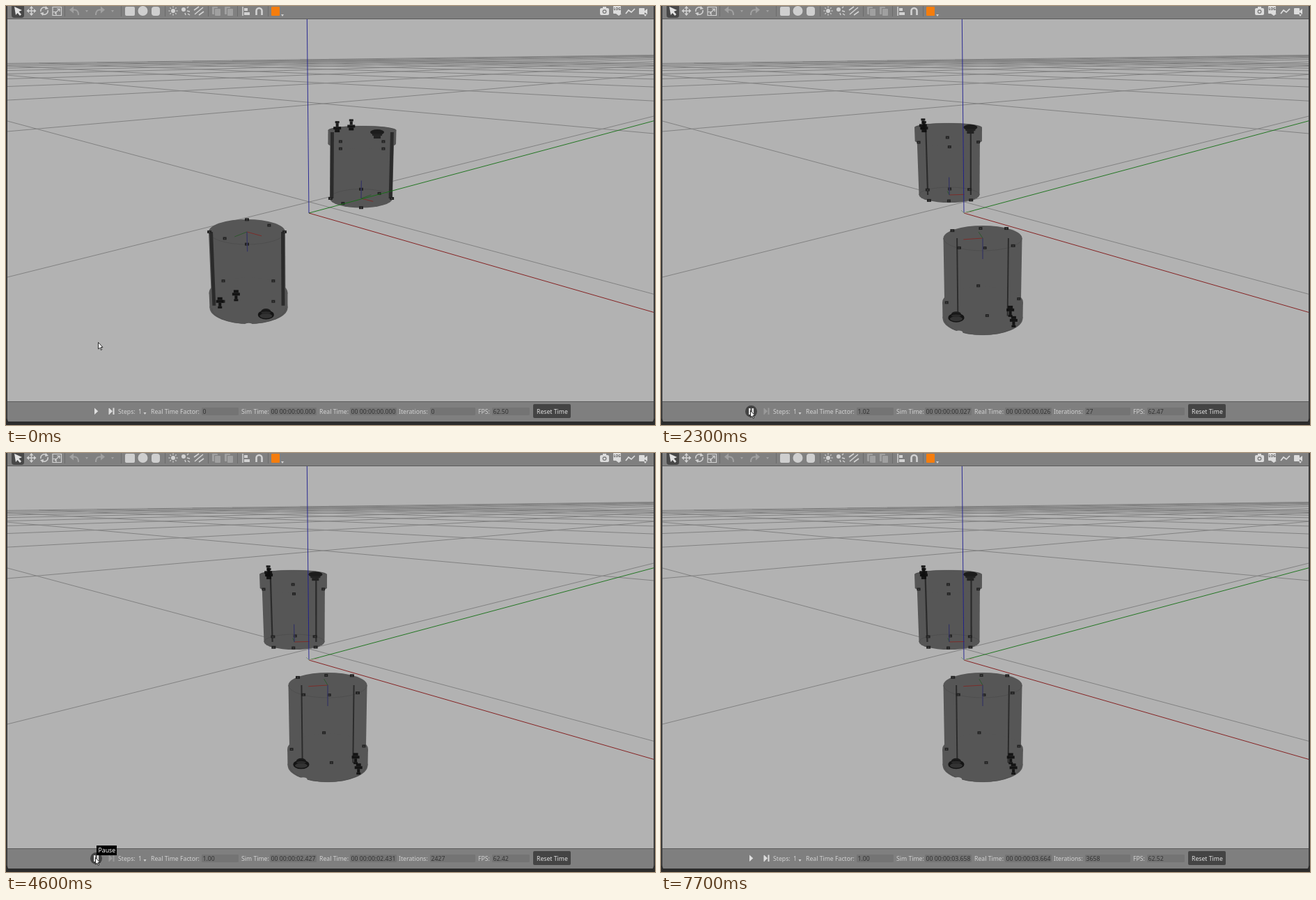
Animation of 932 by 601 pixels, one loop 8 s. Source, as an HTML page with a canvas:

```html
<!DOCTYPE html>
<html lang="en">
<head>
<meta charset="utf-8">
<title>Simulation view</title>
<style>
html, body { margin: 0; width: 100%; height: 100%; overflow: hidden; background: #2d2d2d; }
canvas { display: block; }
</style>
</head>
<body>
<canvas id="stage" width="932" height="601"></canvas>
<script>
const ctx = document.getElementById('stage').getContext('2d');
const LOOP = 8000;
const FONT = '8.7px "Noto Sans", "Open Sans", sans-serif';
const VIEW = '#b2b2b2', BAR = '#808080', RULE = '#5c5c5c';
const LIGHT = '#d2d2d2', DIM = '#a0a0a0', BODY = '#565656', DARK = '#222';

// Ground plane: horizon height and the vanishing points of both grid directions.
const HORIZON = 65.6, VX = -369.6, VY = 1301.6;
const ORIGIN = { x: 435, y: 297 };

// The same tank four times: end ellipses [x, y, rx, ry] and turn in degrees.
const BEFORE = [
  { lid: [511.5, 178, 46, 6], foot: [510, 276, 45, 13.5], turn: 0 },
  { lid: [348.5, 433, 53, 23], foot: [346, 324, 55, 18], turn: 0 }
];
const AFTER = [
  { lid: [412.5, 174, 45.5, 6], foot: [414, 271, 43.5, 11], turn: -47 },
  { lid: [462, 448, 54.5, 24], foot: [462, 333, 56.5, 18], turn: 128 }
];

const RUN = 2300, STOP = 6000, TIP = 4000;
// Last two digits of the frame rate, held until the next time.
const RATES = [[0, 50], [1300, 47], [2500, 37], [4000, 38], [4300, 42], [5500, 46], [6300, 48], [7700, 52]];

function line(x0, y0, x1, y1, color, width = 1) {
  ctx.strokeStyle = color;
  ctx.lineWidth = width;
  ctx.beginPath();
  ctx.moveTo(x0, y0);
  ctx.lineTo(x1, y1);
  ctx.stroke();
}
function rect(x, y, w, h, color) {
  ctx.fillStyle = color;
  ctx.fillRect(x, y, w, h);
}
function round(x, y, w, h, r, color) {
  ctx.fillStyle = color;
  ctx.beginPath();
  ctx.roundRect(x, y, w, h, r);
  ctx.fill();
}
function oval(x, y, rx, ry, color) {
  ctx.fillStyle = color;
  ctx.beginPath();
  ctx.ellipse(x, y, rx, ry, 0, 0, 2 * Math.PI);
  ctx.fill();
}
function shape(d, color) {
  ctx.fillStyle = color;
  ctx.fill(new Path2D(d));
}
function stroke(d, color, width = 1) {
  ctx.strokeStyle = color;
  ctx.lineWidth = width;
  ctx.stroke(new Path2D(d));
}
function text(s, x, y, color) {
  ctx.fillStyle = color;
  ctx.font = FONT;
  ctx.fillText(s, x, y);
}
function caret(x, y, color) {
  shape(`M${x - 2} ${y - 1}h4l-2 3z`, color);
}

function drawGrid() {
  const slopeX = j => 1 / (3.738 + 7.336 * j);
  const slopeY = j => 1 / (4.019 + 7.344 * j);
  const cross = (m, n) => (n * VY + m * VX) / (m + n);
  for (let j = 0; j <= 10; j++) {
    const m = slopeX(j), n = slopeY(j);
    const left = Math.max(0, cross(m, slopeY(10)));
    const start = Math.max(0, cross(slopeX(10), n));
    line(left, HORIZON + m * (left - VX), 932, HORIZON + m * (932 - VX), '#828282');
    const end = Math.min(932, start);
    line(0, HORIZON + n * VY, end, HORIZON + n * (VY - end), '#828282');
    line(end, HORIZON + n * (VY - end), 932, HORIZON + n * (VY - 932), '#828282');
  }
}

function drawAxes() {
  const { x, y } = ORIGIN, rise = y - HORIZON;
  line(x, y, 932, y + rise / (x - VX) * (932 - x), '#801414', .9);
  line(x, y, 932, y - rise / (VY - x) * (932 - x), '#147014', .9);
  line(432.3, 19, x, y, '#1c1c90', .9);
}

const mix = (a, b, k) => a + (b - a) * k;

// Point on a tank: angle in degrees, height from lid (0) to foot (1), radius share.
function place(tank, angle, h, r) {
  const [x, y, rx, ry] = tank.lid.map((v, i) => mix(v, tank.foot[i], h));
  const a = (angle + tank.turn) * Math.PI / 180;
  return [x + r * rx * Math.cos(a), y + r * ry * Math.sin(a)];
}

// Solid between two heights, widened by pad.
function drum(tank, h0, h1, pad, color) {
  const [p, q] = [h0, h1].map(h => tank.lid.map((v, i) => mix(v, tank.foot[i], h)));
  for (const [x, y, rx, ry] of [p, q]) oval(x, y, rx + pad, ry, color);
  ctx.beginPath();
  ctx.moveTo(p[0] - p[2] - pad, p[1]);
  ctx.lineTo(p[0] + p[2] + pad, p[1]);
  ctx.lineTo(q[0] + q[2] + pad, q[1]);
  ctx.lineTo(q[0] - q[2] - pad, q[1]);
  ctx.fill();
}

function drawDot([x, y], w = 5) {
  rect(x - w / 2, y - 2, w, 4, DARK);
  rect(x - 1, y - .5, 2, 1.5, '#404040');
}

function drawKnob(x, y, up) {
  for (const [dy, w, h] of [[-8, 6, 3], [-5, 4, 5], [0, 11, 4], [4, 7, 4]]) {
    rect(x - w / 2, up ? y + dy : y - dy - h, w, h, 'rgba(14,14,14,.9)');
  }
}

function drawCap(x, y, up) {
  if (up) {
    oval(x, y - 2, 10, 4, '#1c1c1c');
    rect(x - 7, y, 14, 3, DARK);
    rect(x - 5, y + 3, 10, 4, DARK);
  } else {
    oval(x, y - 5, 7, 4, '#1d1d1d');
    oval(x, y, 11.5, 6.5, '#141414');
    oval(x, y + 1.5, 9, 3.5, '#333');
    oval(x, y - 3, 7, 2, '#2a2a2a');
  }
}

function drawTank(tank) {
  const up = tank.lid[1] < tank.foot[1];
  drum(tank, 0, 1, 0, BODY);
  drum(tank, 0, .2, 3, BODY);
  ctx.strokeStyle = 'rgba(40,40,40,.2)';
  ctx.lineWidth = .8;
  for (const [x, y, rx, ry] of [tank.lid, tank.foot]) {
    ctx.beginPath();
    ctx.ellipse(x, y, rx, ry, 0, 0, Math.PI, up);
    ctx.stroke();
  }
  for (const angle of [6, 186]) {
    const [x0] = place(tank, angle, .03, .94), [x1] = place(tank, angle, 1, .94);
    const side = Math.cos((angle + tank.turn) * Math.PI / 180);
    line(x0, mix(tank.lid[1], tank.foot[1], .03), x1, tank.foot[1], '#2b2b2b', 1.5 + 3.5 * side ** 6);
  }
  for (let a = 0; a < 360; a += 90) {
    drawDot(place(tank, a, 1, .98), 6);
    drawDot(place(tank, a + 45, .22, .95));
    const [x, y] = place(tank, a, 0, 1.03);
    if (!up && y > tank.lid[1] + 18) oval(x, y + 1, 6, 3, VIEW);
  }
  for (const a of [138, 318]) drawDot(place(tank, a, 1, .78));

  const lift = up ? -3 : 0;
  for (const a of [-158, -114]) {
    const [x, y] = place(tank, a, 0, .84);
    drawKnob(x, y + lift, up);
  }
  const [capX, capY] = place(tank, 48, 0, .7);
  drawCap(capX, capY + (up ? 2 : -2), up);

  const [x, y] = tank.foot;
  line(x, y, ...place(tank, 40, 1, .5), '#7c2d2a');
  line(x, y, ...place(tank, up ? -50 : 130, 1, .5), '#2d582d');
  line(x, y, ...place(tank, 0, .74, 0), '#363662', 1.3);
}

function drawScene(t) {
  ctx.save();
  ctx.beginPath();
  ctx.rect(2, 19, 928, 548);
  ctx.clip();
  rect(2, 19, 928, 548, VIEW);
  drawGrid();
  const moved = t >= RUN;
  const creep = moved ? 1.5 * Math.min(1, Math.max(0, (simTime(t) - 427) / 2800)) : 0;
  for (const tank of moved ? AFTER : BEFORE) drawTank({ ...tank, turn: tank.turn + creep });
  drawAxes();
  if (moved) {
    line(431, 293, 435, 297, '#7d967d');
    line(435, 297, 449, 295, '#b89494');
  }
  ctx.restore();
}

function drawToolbar() {
  rect(0, 0, 932, 19, BAR);
  rect(0, 18, 932, 1, RULE);
  for (const x of [84, 165, 228, 290, 332, 376]) rect(x, 0, 1, 15, '#6c6c6c');

  // Select, move, turn, scale
  round(8, -5, 18, 22, 4, '#484848');
  shape('M12 1L23 6L18.5 8L22 12L20 14L16.5 10L14 13Z', '#e2e2e2');
  stroke('M31 7H42M36.5 2V13', LIGHT, 1.5);
  shape('M36.5 0l3 3.5h-6zM36.5 14l3-3.5h-6zM29.5 7l3.5-3v6zM43.5 7l-3.5-3v6z', LIGHT);
  stroke('M50 8A5 5 0 0 1 58 3M60 6A5 5 0 0 1 52 11', LIGHT, 1.6);
  shape('M57 0l4 4-5 1zM53 14l-4-4 5-1z', LIGHT);
  stroke('M67 1.5H79.5V13.5H67ZM70 11L77 4M73 4h4v4M67 8.5h5v5', LIGHT, 1.2);

  // Undo and its mirror image
  for (const [x, dir] of [[98, 1], [135, -1]]) {
    ctx.save();
    ctx.translate(x, 0);
    ctx.scale(dir, 1);
    stroke('M-4 5.5H1Q6 6 6 13', DIM, 2);
    shape('M-7 5.5l6-5v10z', DIM);
    ctx.restore();
    caret(x + 18, 7, DIM);
  }

  // Solids and lights
  round(171, 1, 14, 13, 2, '#cfcfcf');
  oval(196.5, 7, 7, 7, '#cfcfcf');
  round(209, 1, 12, 13, 4, '#cfcfcf');
  oval(240, 7, 3, 3, LIGHT);
  for (let i = 0; i < 8; i++) {
    const a = i * Math.PI / 4, dx = Math.cos(a), dy = Math.sin(a);
    line(240 + 4.5 * dx, 7 + 4.5 * dy, 240 + 6.5 * dx, 7 + 6.5 * dy, LIGHT, 1.3);
  }
  oval(255, 5, 3, 3, LIGHT);
  stroke('M260 3L262 1M260 7L264 8M257 10L258 13M261 11L264 13', LIGHT, 1.4);
  stroke('M270 6L277 1M271 12L283 2M277 13L284 8', LIGHT, 1.6);

  // Copy, paste, align, snap, view
  for (const x of [296, 314]) {
    round(x, 1, 8, 11, 1, DIM);
    round(x + 3, 3, 9, 11, 1, BAR);
    round(x + 4, 4, 8, 10, 1, DIM);
  }
  stroke('M340 1V14', LIGHT, 1.5);
  rect(342, 3, 5, 4, LIGHT);
  rect(342, 9, 8, 4, LIGHT);
  stroke('M359.5 13V7A4 4 0 0 1 367.5 7V13', LIGHT, 2.6);
  round(381, 1, 12, 13, 1, '#f57d0d');
  caret(397, 13, LIGHT);

  // Camera, log, plot, video
  const pale = '#dcdcdc';
  round(853, 3, 13, 10, 2, pale);
  rect(857, 1, 5, 3, pale);
  oval(859.5, 8, 3, 3, BAR);
  oval(859.5, 8, 1.6, 1.6, pale);
  round(872, 0, 11, 11, 1, pale);
  ctx.font = 'bold 5px "Noto Sans", sans-serif';
  ctx.fillStyle = '#555';
  ctx.fillText('LOG', 872.5, 6);
  shape('M876 9h6v2h2l-4 3-4-3z', pale);
  stroke('M890 11L894 6L898 9L903 4', pale, 1.7);
  round(909, 3, 8, 9, 1, pale);
  shape('M917 7l4-3v8l-4-3z', pale);
  caret(918, 13, pale);
}

// Simulated milliseconds; the display refreshes in jumps of 200 or 400.
function simTime(t) {
  if (t < RUN) return 0;
  if (t >= STOP) return 3658;
  if (t < TIP) return 27 + 200 * Math.min(2, Math.floor((t - RUN) / 100));
  const k = Math.min(5, Math.floor((t - TIP) / 300));
  return 1827 + 200 * Math.floor(1.5 * k);
}

function stamp(ms) {
  return '00 00:00:' + (ms / 1000).toFixed(3).padStart(6, '0');
}

function drawStatus(t, hover) {
  const sim = simTime(t);
  const real = sim && sim + Math.round(sim * .0019 - 1);
  const factor = t < RUN ? '0' : sim < 100 ? '1.02' : '1.00';
  const fps = '62.' + RATES.filter(r => r[0] <= t).pop()[1];
  const running = t >= RUN && t < STOP;

  rect(0, 567, 932, 29, '#7f7f7f');
  rect(0, 567, 932, 1, RULE);
  if (hover) oval(129.5, 581.5, 8.5, 8.5, '#434343');
  if (running) {
    for (const x of [126, 130.5]) rect(x, 577, 2.6, 9, '#e0e0e0');
  } else {
    shape('M127 576.5L132.3 581.3L127 586Z', '#dedede');
  }
  const step = running ? '#999' : '#dcdcdc';
  shape('M148 576.5L153 581.3L148 586Z', step);
  rect(147.5, 577, 1.2, 9, step);
  rect(153.5, 576.5, 2, 9.5, step);

  const labels = [['Steps:', 161], ['1', 190], ['Real Time Factor:', 208], ['Sim Time:', 338],
    ['Real Time:', 450], ['Iterations:', 564], ['FPS:', 678]];
  for (const [s, x] of labels) text(s, x, 585, LIGHT);
  caret(199.5, 584, LIGHT);
  const fields = [[281, 53, factor], [379, 67, stamp(sim)], [494, 67, stamp(real)],
    [609, 65, String(sim)], [698, 54, fps]];
  for (const [x, w, s] of fields) {
    round(x, 576, w, 11, 1, '#747474');
    text(s, x + 1.5, 585, '#333');
  }
  round(757, 571, 54, 20, 2, '#444');
  text('Reset Time', 762, 584.5, '#e0e0e0');
}

function drawFrame() {
  for (const x of [0, 930]) rect(x, 0, 2, 601, '#3a3a3a');
  rect(0, 596, 932, 5, '#2c2c2c');
  shape('M0 592V601H6V597Q2 597 2 592ZM932 592V601H926V597Q930 597 930 592Z', '#2c2c2c');
}

function pointer(t) {
  if (t < 1100) {
    const k = Math.min(9, Math.max(0, Math.floor(t / 100) - 1)) / 9;
    const e = k * k * (3 - 2 * k);
    return [Math.round(132 - 4 * e), Math.round(482 + 96 * e)];
  }
  if (t < 6600) return [128, 580];
  if (t < 6900) return [129, 405];
  if (t < 7200) return [120, 85];
  return t < 7700 ? [74, 27] : null;
}

function drawPointer(x, y) {
  ctx.save();
  ctx.translate(x + .5, y + .5);
  ctx.lineJoin = 'round';
  const arrow = 'M0 0V9.5L2.2 7.6L3.8 11L5.2 10.4L3.7 7H6.5Z';
  shape(arrow, '#fff');
  stroke(arrow, '#1a1a1a', .9);
  ctx.restore();
}

function draw(t) {
  const p = pointer(t);
  drawScene(t);
  drawToolbar();
  drawStatus(t, p !== null && p[1] > 571);
  drawFrame();
  if (t >= TIP && t < STOP) {
    rect(130, 563, 29, 14, '#000');
    text('Pause', 132.5, 573, '#fff');
  }
  if (p) drawPointer(...p);
}

const start = performance.now();
function tick() {
  draw((performance.now() - start) % LOOP);
  requestAnimationFrame(tick);
}
tick();
</script>
</body>
</html>
```
